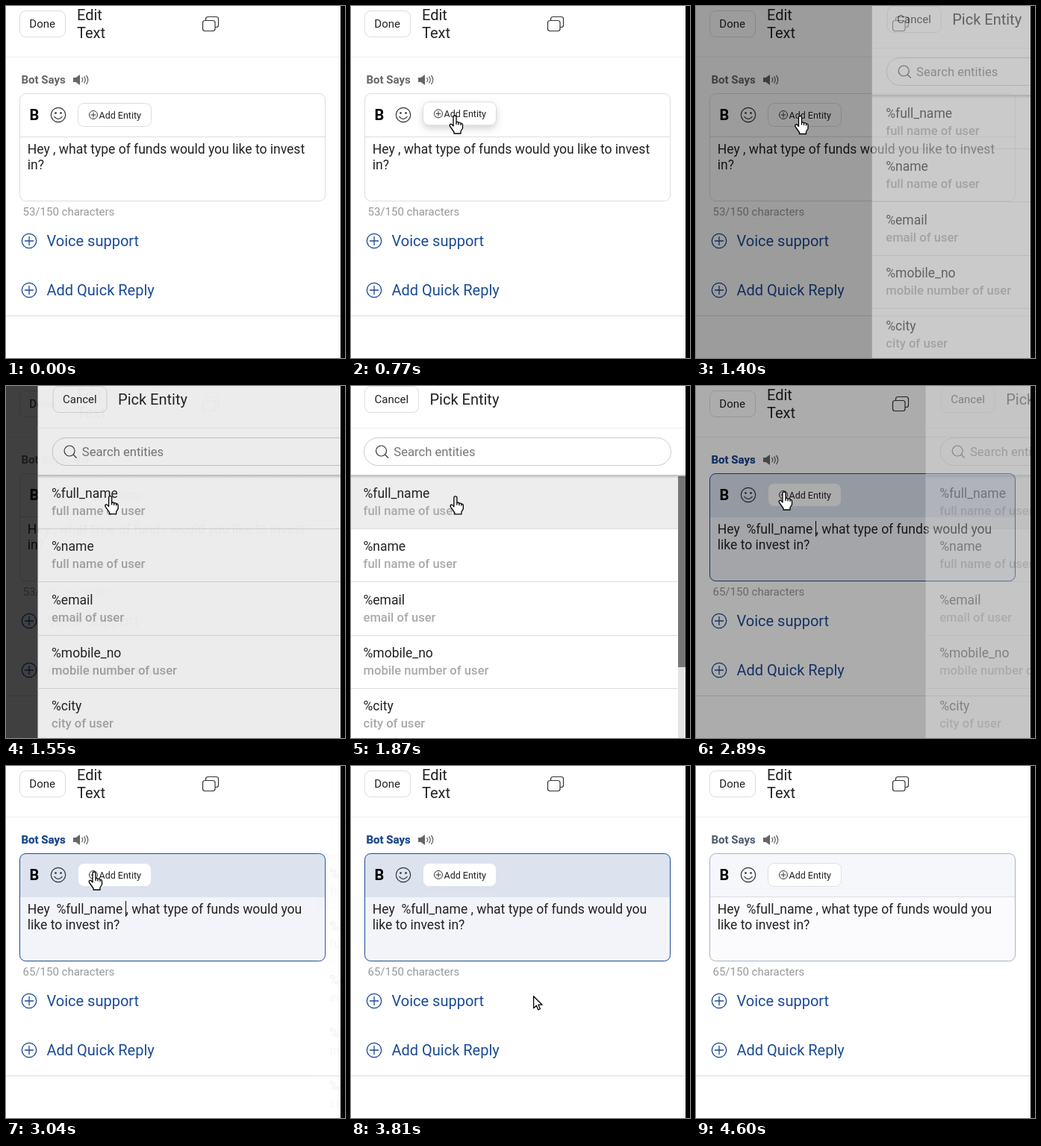
Recreate the animation shown at these times as an HTML page. Size 454 px wide and 472 px high, loop 4.68 s.

```html
<!DOCTYPE html>
<html lang="en">
<head>
<meta charset="utf-8">
<title>Pick Entity</title>
<style>
html, body { margin: 0; width: 100%; height: 100%; overflow: hidden; background: #fff; }
svg { display: block; font-family: Roboto, Arial, sans-serif; fill: #222; }
text { white-space: pre; }
.line { fill: none; stroke: #ddd; }
.box { fill: #fff; stroke: #ddd; }
.icon { fill: none; stroke: #333; stroke-width: 1.2; }
.link { fill: #1b4b96; font-size: 20px; }
.link .icon { stroke: #1b4b96; stroke-width: 1.3; }
.label { font-size: 15px; font-weight: 700; }
.say { font-size: 17.5px; }
.title { font-size: 20px; }
.btn { font-size: 15px; }
.hint { fill: #aaa; font-size: 16.6px; font-weight: 500; }
</style>
</head>
<body>
<svg width="454" height="472" viewBox="0 0 454 472">
  <defs>
    <clipPath id="view"><rect width="448" height="472"/></clipPath>
    <linearGradient id="shade" x2="0" y2="1">
      <stop offset="0" stop-opacity=".24"/><stop offset="1" stop-opacity="0"/>
    </linearGradient>
  </defs>
  <rect width="454" height="472" fill="#000"/>
  <g clip-path="url(#view)">
    <rect width="448" height="472" fill="#fff"/>
    <rect class="box" x="18.5" y="6.5" width="61" height="35" rx="8"/>
    <text class="btn" x="31.3" y="29">Done</text>
    <text class="title" x="95" y="19">Edit</text>
    <text class="title" x="95" y="43">Text</text>
    <path class="icon" d="M266 19.5h11q3 0 3 3v8q0 3-3 3h-10.5q-3 0-3-3v-8q0-3 3-3M267.5 19v-1.5q0-3 3-3h11q3 0 3 3v8q0 3-3 3h-1"/>
    <path class="line" d="M0 68.5H448" style="stroke:#eee"/>
    <text class="label" x="20.5" y="104" fill="#666">Bot Says</text>
    <g fill="#666">
      <path d="M90 96h3.5l5.5-4v14l-5.5-4H90z"/>
      <path d="M101.5 96q2.5 3 0 6M104.5 94.5q3.5 4.5 0 9M107.5 93q4.5 6 0 12" fill="none" stroke="#666" stroke-width="1.3"/>
    </g>
    <rect class="box" x="18.5" y="117.5" width="409" height="144" rx="8"/>
    <path class="line" d="M19 175.5H427"/>
    <g id="focus">
      <rect x="18.5" y="117.5" width="409" height="144" rx="8" fill="#f3f4f9"/>
      <path d="M18.5 176V125.5q0-8 8-8h393q8 0 8 8V176z" fill="#dce3ef"/>
      <rect x="18.5" y="117.5" width="409" height="144" rx="8" fill="none" stroke="#1b4b96"/>
      <text class="label" x="20.5" y="104" fill="#1b4b96">Bot Says</text>
    </g>
    <text x="31.5" y="153" font-size="20" font-weight="700" fill="#000">B</text>
    <circle class="icon" cx="70" cy="146" r="9.7"/>
    <path class="icon" d="M64.5 148q5.5 7 11 0"/>
    <circle cx="66.5" cy="143.5" r="1.3"/><circle cx="73.5" cy="143.5" r="1.3"/>
    <g id="entity">
      <rect class="box" x="96.5" y="130.5" width="98" height="31" rx="8"/>
      <path class="icon" d="M113.5 146h7M117 142.5v7" style="stroke-width:1"/>
      <circle class="icon" cx="117" cy="146" r="5.5" style="stroke-width:1"/>
      <text x="124.5" y="151" font-size="12.5">Add Entity</text>
    </g>
    <text id="say1" class="say" x="28.8" y="198"></text>
    <text id="say2" class="say" x="28.8" y="219"></text>
    <path id="caret" d="M160.5 181v21" stroke="#000"/>
    <text id="count" x="22.5" y="281" font-size="15" fill="#999"></text>
    <g class="link">
      <circle class="icon" cx="31" cy="315" r="9.7"/><path class="icon" d="M25 315h12M31 309v12"/>
      <text x="54.5" y="322">Voice support</text>
    </g>
    <g class="link" id="reply">
      <circle class="icon" cx="31" cy="381" r="9.7"/><path class="icon" d="M25 381h12M31 375v12"/>
      <text x="54.5" y="388">Add Quick Reply</text>
    </g>
    <path class="line" d="M0 415.5H448"/>

    <rect id="scrim" width="448" height="472" fill="#000"/>
    <g id="panel">
      <rect x="-2" width="450" height="472" fill="#fff"/>
      <rect class="box" x="18.5" y=".5" width="72" height="35" rx="8"/>
      <text class="btn" x="31.5" y="23">Cancel</text>
      <text class="title" x="105.5" y="25">Pick Entity</text>
      <path class="line" d="M-2 56.5H448" style="stroke:#eee"/>
      <rect class="box" x="17.5" y="69.5" width="411" height="37" rx="18.5" style="stroke:#ccc"/>
      <circle class="icon" cx="40.5" cy="87" r="7"/><path class="icon" d="M45.5 92l4.5 4.5"/>
      <text x="57.3" y="94" font-size="16.6" fill="#777">Search entities</text>
      <rect id="hover" x="-2" y="120" width="450" height="71" fill="#ededed"/>
      <g id="rows"></g>
      <rect x="438" y="120" width="10" height="352" fill="#e4e4e4"/>
      <rect x="438" y="121" width="10" height="256" fill="#777"/>
      <rect x="-2" y="119" width="450" height="5" fill="url(#shade)"/>
    </g>
    <g id="cursor" fill="#fff" stroke="#000" stroke-width="1.3" stroke-linejoin="round">
      <path id="hand" d="M-2 2Q-2 0 0 0T2 2V9Q4 7.5 5 9.5Q7 8.5 8 10.5Q10 10 10.5 12V17L8 21V24H-1V22L-6 15Q-7.5 12.5-6 11.5T-2 14ZM2 9v3M5 9.5v3M8 10.5v2.5"/>
      <path id="arrow" d="M0 0V16L3.8 12.5L6.2 18.2L8.8 17L6.4 11.5H11.5Z"/>
    </g>
  </g>
</svg>
<script>
const LOOP = 4680, OPEN = 1294, CLOSE = 2743, SLIDE = 700;
const $ = id => document.getElementById(id);
const clamp = v => Math.max(0, Math.min(1, v));
const ramp = (t, from, to) => clamp((t - from) / (to - from));
const easeOut = u => 1 - (1 - u) ** 3;

const entities = [['full_name', 'full name'], ['name', 'full name'], ['email', 'email'],
  ['mobile_no', 'mobile number'], ['city', 'city']];
$('rows').innerHTML = entities.map(([key, hint], i) => {
  const y = Math.round(i * 71.25);
  return `<text x="16.5" y="${150 + y}" font-size="17.5">%${key}</text>
    <text class="hint" x="16.5" y="${173 + y}">${hint} of user</text>
    <path class="line" d="M-2 ${191.5 + y}H448"/>`;
}).join('');

// cubic-bezier(.32, .72, 0, 1)
function glide(x) {
  let lo = 0, hi = 1, s;
  for (let i = 0; i < 24; i++) {
    s = (lo + hi) / 2;
    if (0.96 * (1 - s) ** 2 * s + s ** 3 < x) lo = s; else hi = s;
  }
  return 2.16 * (1 - s) ** 2 * s + 3 * (1 - s) * s * s + s ** 3;
}

// time, x, y
const path = [[230, 256, 367], [390, 170, 115], [620, 170, 115], [770, 139, 147],
  [2030, 140, 148], [2200, 146, 162], [2410, 118, 142], [3580, 118, 142], [4040, 370, 474]];

function pointer(t) {
  const i = Math.max(1, path.findIndex(k => k[0] > t));
  const [a, b] = [path[i - 1], path[i]], u = ramp(t, a[0], b[0]);
  return [a[1] + (b[1] - a[1]) * u, a[2] + (b[2] - a[2]) * u];
}

const show = (id, on) => $(id).setAttribute('visibility', on ? 'visible' : 'hidden');
const fade = (id, v) => $(id).setAttribute('opacity', v);

function draw(t) {
  const done = t >= CLOSE;

  $('say1').textContent = done ? 'Hey  %full_name , what type of funds would you'
    : 'Hey , what type of funds would you like to invest';
  $('say2').textContent = done ? 'like to invest in?' : 'in?';
  $('count').textContent = (done ? 65 : 53) + '/150 characters';
  show('caret', done && (t < 3360 || (t >= 3860 && t < 4360)));

  const focus = done ? 1 - ramp(t, 4500, 4640) : 0;
  fade('focus', focus);
  const lift = t < OPEN ? easeOut(ramp(t, 640, 930))
    : easeOut(ramp(t, 3180, 3430)) - ramp(t, 3600, 3820);
  const entity = $('entity');
  entity.setAttribute('transform', `translate(0 ${-2 * lift})`);
  entity.style.filter = lift > 0 ? `drop-shadow(0 4px 5px rgba(0,0,0,${0.2 * lift}))` : 'none';
  entity.firstElementChild.style.stroke =
    `rgb(${221 - focus},${221 + 6 * focus},${221 + 18 * focus})`;

  const shown = done ? 1 - glide(clamp((t - CLOSE) / SLIDE))
    : t >= 1870 ? 1 : t > OPEN ? glide((t - OPEN) / SLIDE) : 0;
  show('panel', t > OPEN && t < 3120);
  $('panel').setAttribute('transform', `translate(${448 * (1 - shown)} 0)`);
  fade('panel', shown);
  fade('scrim', done ? 0.8 * (1 - ramp(t, CLOSE, CLOSE + 250)) : 0.83 * shown);
  show('hover', t >= 1780 && t < 3120);

  const [x, y] = pointer(t);
  const inside = t >= 230 && t < 4040;
  const overReply = inside && y > 362 && y < 400;
  const hand = overReply || (t > 680 && t < 3640);
  fade('reply', overReply ? 0.8 : 1);
  $('cursor').setAttribute('transform', `translate(${x} ${y})`);
  show('hand', inside && hand);
  show('arrow', inside && !hand);
}

const start = performance.now();
function tick() {
  draw((performance.now() - start) % LOOP);
  requestAnimationFrame(tick);
}
tick();
</script>
</body>
</html>
```
